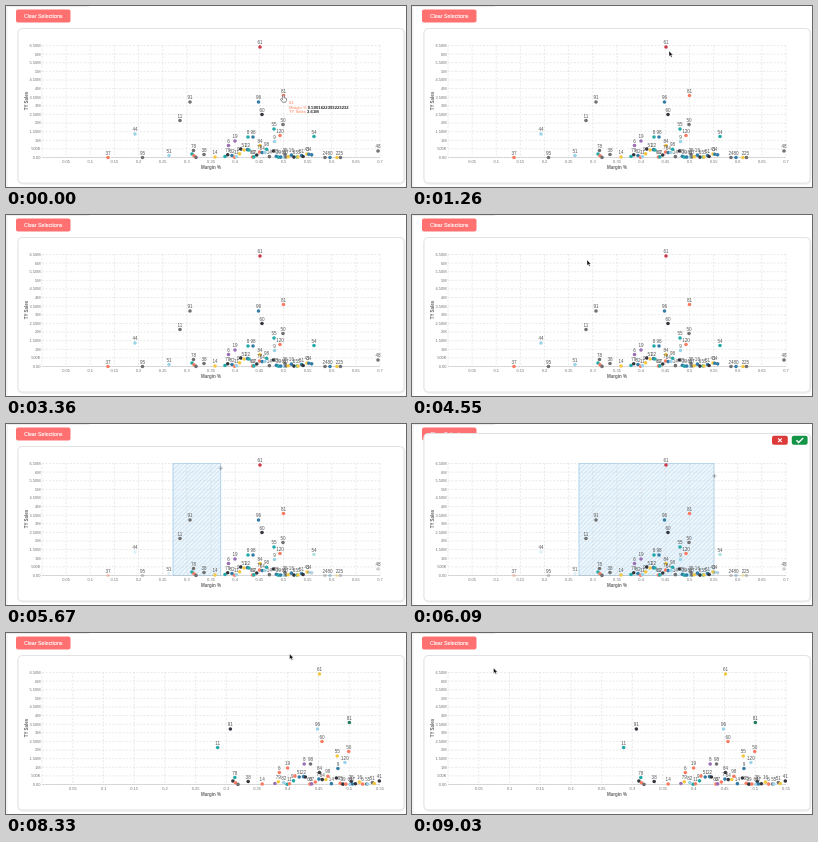
These frames come from a looping animation (400 by 181 pixels, 9.1 s). An HTML page:

```html
<!DOCTYPE html>
<html lang="en">
<head>
<meta charset="utf-8">
<title>Scatter chart selection</title>
<style>
  html, body { margin: 0; width: 100%; height: 100%; overflow: hidden; background: #fff; }
  svg { display: block; width: 400px; height: 181px; font-family: "Liberation Sans", Arial, sans-serif; }
  .tick { font-size: 4px; fill: #707070; }
  .label { font-size: 4.6px; fill: #555; text-anchor: middle; }
  .title { font-size: 4.5px; font-weight: bold; fill: #666; text-anchor: middle; }
  .grid { stroke: #d4d4d4; stroke-width: .5; stroke-dasharray: 2 1.5; }
  .tip { font-size: 4.2px; fill: #222; }
  .tip .key { fill: #ff7c55; }
  .tip .value { font-weight: bold; }
</style>
</head>
<body>
<svg id="stage" viewBox="0 0 400 181">
  <defs>
    <pattern id="hatch" width="3" height="3" patternUnits="userSpaceOnUse" patternTransform="rotate(45)">
      <rect width="3" height="3" fill="#f3f9fd"/>
      <rect width="1.3" height="3" fill="#cfe6f6"/>
    </pattern>
  </defs>
  <path d="M1 181V.5H83" fill="none" stroke="#e4e4e4" stroke-width=".7"/>
  <rect x="10" y="3.6" width="54.5" height="12.8" rx="2" fill="#ff7070"/>
  <text x="37.2" y="11.9" font-size="5.3" fill="#fff" stroke="#fff" stroke-width=".12" text-anchor="middle">Clear Selections</text>
  <rect id="shade" x="12.4" width="386" rx="4" fill="none" stroke="#f1f1f1" stroke-width="2"/>
  <rect id="card" x="12" width="386" rx="4" fill="#fff" stroke="#dedede" stroke-width=".8"/>
  <rect id="brush" x="167" y="39.5" height="112" fill="url(#hatch)" stroke="#9fcdeb" stroke-width=".8"/>
  <g id="charts"></g>
  <g id="actions">
    <rect x="360" y="11.8" width="15.8" height="9" rx="2" fill="#dc3a3a"/>
    <path d="M366 14.4l3.8 3.8m0-3.8l-3.8 3.8" stroke="#fff" stroke-width="1.1"/>
    <rect x="379.8" y="11.8" width="15.8" height="9" rx="2" fill="#149447"/>
    <path d="M384.4 16.3l2.2 2.2 4.6-4.4" fill="none" stroke="#fff" stroke-width="1.4"/>
  </g>
  <g id="tip" class="tip">
    <text x="283" y="98.2" class="key">81</text>
    <text x="283" y="102.5"><tspan class="key">Margin %</tspan> <tspan class="value">0.5001622393223232</tspan></text>
    <text x="283" y="106.8"><tspan class="key">TY Sales</tspan> <tspan class="value">3.61M</tspan></text>
  </g>
  <g id="cursor">
    <path id="arrow" d="M0 0V5.4L1.3 4.3 2.2 6.3 3.2 5.8 2.3 3.9H4Z" fill="#111" stroke="#fff" stroke-width=".4"/>
    <path id="cross" d="M-2 0H2M0-2V2" stroke="#777" stroke-width=".6"/>
    <path id="hand" d="M-.8-1.4q.8-1 1.6 0v2.2l2.2.7v2l-.9 1.7H-1L-3 2.4l.8-.7 1.4 1z" fill="#fff" stroke="#444" stroke-width=".6"/>
  </g>
</svg>
<script>
const NS = "http://www.w3.org/2000/svg";
const LOOP = 9100, STEP = 70;
const LEFT = 36, RIGHT = 374, TOP = 39.5, BASE = 151.5;
const BRUSH = [167, 302];
const $ = id => document.getElementById(id);

const colors = {
  r: "#cc3a49", o: "#fa7b62", k: "#33363d", g: "#707070", b: "#337ca5",
  t: "#21aaa8", l: "#9bd3e8", y: "#f4c842", n: "#26795b", p: "#9b6eb4"
};

// x, y, label, colour before and after filtering
const points = `254 41 61 ry,277.5 89.5 81 on,184 96 91 gk,252.5 96 96 bl,256 108.5 60 ko,
174 114.5 11 gt,129 128 44 ll,102 151.5 37 oo,136.5 151.5 95 gg,163 149.5 51 ll,
198 148.5 38 gk,187.5 144.5 78 gt,209 151 14 yo,229 135 19 po,222.5 139.5 6 po,
372 145 48 gg,308 130.5 54 tt,277 118.5 50 go,268 123 55 ty,274 129.5 120 ol,
242 131 8 tp,247 131 98 bg,254 139.5 84 yk,268.5 135.5 9 lb,279 148.5 35 gk,
319 151.5 24 gg,324 151.5 80 bb,331 151.5 2 yy,334.5 151.5 25 gg`.split(",").map(row => {
  const [x, y, label, tint] = row.trim().split(" ");
  return { x: +x, y: +y, label, tint };
});

let seed = 17;
const random = () => (seed = (seed * 16807) % 2147483647) / 2147483647;
const pick = list => list[Math.floor(random() * list.length)];
for (let i = 0; i < 34; i++) {
  const x = 219 + i * 2.6 + random() * 2;
  points.push({
    x,
    y: 151.3 - random() * (x > 232 && x < 272 ? 9 : 3.5),
    label: i % 3 ? String(Math.floor(2 + random() * 97)) : "",
    tint: pick("tbgokyltb") + pick("otkgylbpo")
  });
}
[186, 188, 190].forEach((x, i) =>
  points.push({ x, y: 148 + i * 1.7, label: "", tint: ["tk", "oo", "gg"][i] }));

function add(parent, tag, attrs, text) {
  const node = document.createElementNS(NS, tag);
  for (const key in attrs) node.setAttribute(key, attrs[key]);
  if (text !== undefined) node.textContent = text;
  parent.appendChild(node);
  return node;
}

function money(half) {
  if (!half) return "0.00";
  if (half === 1) return "500K";
  return half % 2 ? (half / 2).toFixed(2) + "M" : half / 2 + "M";
}

function buildChart(ticks, filtered) {
  const chart = add($("charts"), "g", {});
  const line = (x1, y1, x2, y2) => add(chart, "line", { x1, y1, x2, y2, class: "grid" });
  for (let i = 0; i <= 13; i++) {
    const y = BASE - i * (BASE - TOP) / 13;
    line(LEFT, y, RIGHT, y);
    add(chart, "text", { x: 34.5, y: y + 1.4, class: "tick", "text-anchor": "end" }, money(i));
  }
  for (let i = 0; i <= ticks; i++) {
    const x = LEFT + i * (RIGHT - LEFT) / ticks;
    line(x, TOP, x, BASE);
    if (i) add(chart, "text", { x, y: 157.3, class: "tick", "text-anchor": "middle" }, +(i * .05).toFixed(2));
  }
  add(chart, "path", { d: `M${LEFT} ${BASE}H${RIGHT}`, stroke: "#bbb", "stroke-width": .5 });
  add(chart, "text", { x: 205, y: 163, class: "title" }, "Margin %");
  add(chart, "text", { transform: "translate(22 95) rotate(-90)", class: "title" }, "TY Sales");

  const outside = [];
  for (const p of points) {
    const out = p.x < BRUSH[0] || p.x > BRUSH[1];
    if (filtered && out) continue;
    const cx = LEFT + (p.x - LEFT) * 14 / ticks;
    const dot = add(chart, "circle", { cx, cy: p.y, r: 1.8, fill: colors[p.tint[filtered ? 1 : 0]] });
    if (out) outside.push(dot);
    add(chart, "text", { x: cx, y: p.y - 2.9, class: "label" }, p.label);
  }
  return { chart, outside };
}

const full = buildChart(14, false);
const narrow = buildChart(11, true);

// time, x, y
const path = [
  [0, 277.5, 91], [980, 277.5, 91], [1260, 257, 45], [1400, 257, 45], [1610, 260, 43],
  [1680, 260, 43], [2030, 314, 42], [2170, 320, 42], [2380, 320, 42], [3010, 331, 120],
  [3430, 340, 70], [3920, 318, 46], [4060, 318, 46], [4550, 175, 45], [4690, 174, 42],
  [4760, 174, 42], [5250, 167, 40], [5390, 167, 40], [6090, 302.5, 52], [6370, 302.5, 52],
  [7000, 381, 19], [7070, 381, 19], [7280, 386, 16], [8050, 386, 16], [8750, 95, 30],
  [8820, 95, 30], [9030, 81.5, 35], [9100, 81.5, 35]
];

function cursorAt(t) {
  const i = path.findIndex(k => k[0] > t);
  const [a, b] = [path[i - 1], path[i]];
  const u = (t - a[0]) / (b[0] - a[0]);
  const e = u * u * (3 - 2 * u);
  return [a[1] + (b[1] - a[1]) * e, a[2] + (b[2] - a[2]) * e];
}

const show = (node, on) => node.setAttribute("display", on ? "inline" : "none");
const between = (t, a, b) => t >= a && t < b;

function render(t) {
  const [x, y] = cursorAt(t);
  const hover = t < 1050;
  const brushing = between(t, 5460, 7630);
  const confirming = between(t, 6090, 7630);
  const filtered = t >= 7700;
  const crosshair = between(t, 5250, 6510);

  $("cursor").setAttribute("transform", `translate(${x} ${y})`);
  show($("cursor"), !between(t, 3010, 3500));
  show($("hand"), hover);
  show($("cross"), crosshair);
  show($("arrow"), !hover && !crosshair);
  show($("tip"), hover);
  show($("actions"), confirming);
  show(full.chart, !filtered);
  show(narrow.chart, filtered);

  const top = confirming ? 9.5 : 22.5;
  for (const id of ["card", "shade"]) {
    $(id).setAttribute("y", top + (id === "shade" ? .8 : 0));
    $(id).setAttribute("height", 177 - top);
  }

  const edge = Math.min(BRUSH[1], Math.max(BRUSH[0], x));
  const right = t < 6090 ? edge : BRUSH[1];
  show($("brush"), brushing);
  $("brush").setAttribute("width", right - BRUSH[0]);
  for (const dot of full.outside) dot.setAttribute("opacity", brushing ? .35 : 1);
}

function tick(now) {
  render(Math.floor((now % LOOP) / STEP) * STEP);
  requestAnimationFrame(tick);
}
render(0);
requestAnimationFrame(tick);
</script>
</body>
</html>
```
